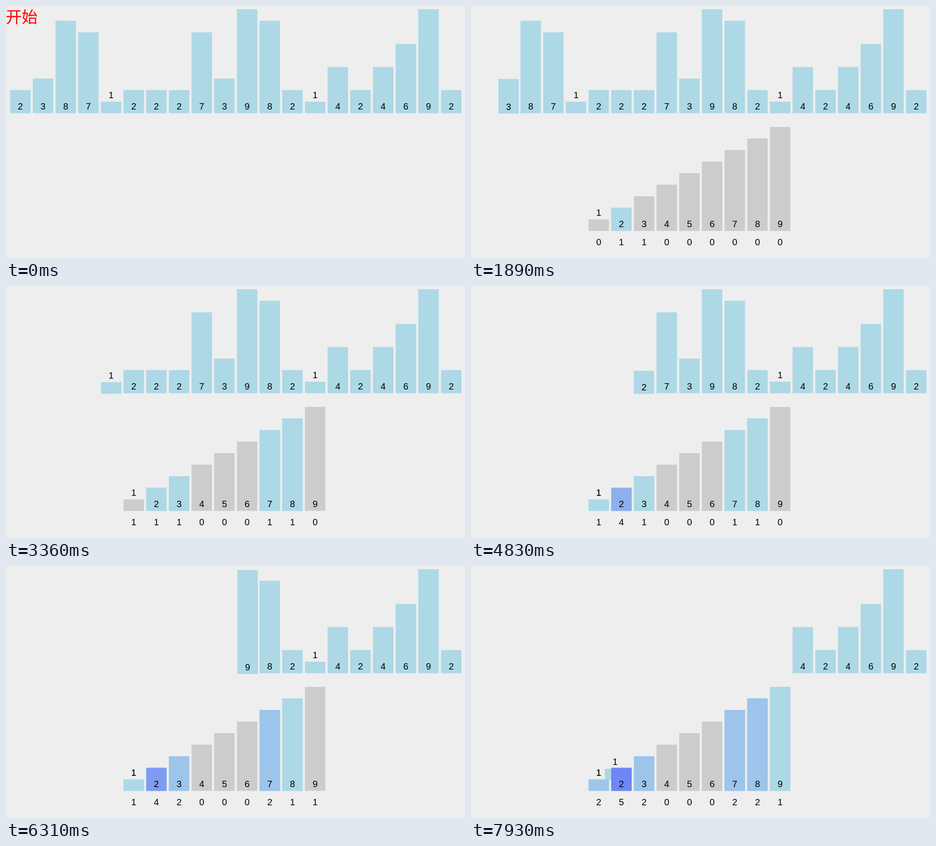
An HTML page with a canvas that plays this animation: 1009x555 px, repeating every 8 s.

```html
<!DOCTYPE html>
<html lang="zh">
<head>
<meta charset="utf-8">
<title>Counting sort</title>
<style>
  html, body { margin: 0; width: 100%; height: 100%; overflow: hidden; background: #eee; }
  canvas { display: block; }
</style>
</head>
<body>
<canvas id="stage" width="1009" height="555"></canvas>
<script>
const ctx = document.getElementById('stage').getContext('2d');
const values = [2, 3, 8, 7, 1, 2, 2, 2, 7, 3, 9, 8, 2, 1, 4, 2, 4, 6, 9, 2];
const LOOP = 8000, INTRO = 1000, TICK = 147.2;
const MOVE = 250, PERIOD = 490, FIRST_MOVE = 1369;
const PITCH = 49.85, WIDTH = 44.9, UNIT = 25.45;
const TOP_BASE = 236.2, DROP = 259.1;
const GREY = [204, 204, 204];

const columnX = i => 9.1 + PITCH * i;
const mix = (a, b, p) => a + (b - a) * p;

// Cubic ease in and out, counted from the given start
function progress(time, start) {
  const p = Math.min(1, Math.max(0, (time - start) / MOVE));
  return p < 0.5 ? 4 * p ** 3 : 1 - 4 * (1 - p) ** 3;
}

function bucketColor(count) {
  const k = count - 1;
  return count ? [173 - 15.8 * k, 216 - 20.3 * k, 230 + 3.6 * k] : GREY;
}

function text(str, x, y) {
  ctx.fillStyle = '#000';
  ctx.fillText(str, x + WIDTH / 2, y);
}

function bar(value, x, base, color, size = 1) {
  const height = UNIT * value;
  ctx.fillStyle = `rgb(${color.map(Math.round)})`;
  ctx.fillRect(x, base - height, WIDTH * size, height * size);
  text(value, x, base - (value === 1 ? 33.7 : 8));
}

function draw(time) {
  ctx.fillStyle = '#eee';
  ctx.fillRect(0, 0, 1009, 555);

  if (time < INTRO) {
    ctx.font = '300 35px "Noto Sans CJK SC", "Noto Sans CJK", sans-serif';
    ctx.textAlign = 'left';
    ctx.fillStyle = '#f00';
    ctx.fillText('开始', -0.5, 37.3);
  }

  ctx.font = '20px "Liberation Sans", Arial, sans-serif';
  ctx.textAlign = 'center';
  const stepped = time < INTRO ? 0 : INTRO + Math.floor((time - INTRO) / TICK) * TICK;
  const counts = Array(10).fill(0);
  const tint = Array(10).fill(1);

  values.forEach((value, i) => {
    const start = FIRST_MOVE + PERIOD * i;
    const p = progress(stepped, start);
    if (stepped >= start) {
      counts[value]++;
      tint[value] = p;
    }
    bar(value, mix(columnX(i), columnX(value + 4), p), TOP_BASE + DROP * p, bucketColor(1));
  });

  if (time < INTRO) return;
  // Buckets cover the bars that have landed in them
  const size = progress(stepped, FIRST_MOVE - PERIOD);
  for (let value = 1; value <= 9; value++) {
    const count = counts[value], x = columnX(value + 4);
    const before = bucketColor(Math.max(0, count - 1));
    const color = bucketColor(count).map((c, j) => mix(before[j], c, tint[value]));
    bar(value, x, TOP_BASE + DROP, color, size);
    text(count, x, 527.3);
  }
}

const origin = performance.now();
function loop() {
  draw((performance.now() - origin) % LOOP);
  requestAnimationFrame(loop);
}
loop();
</script>
</body>
</html>
```
